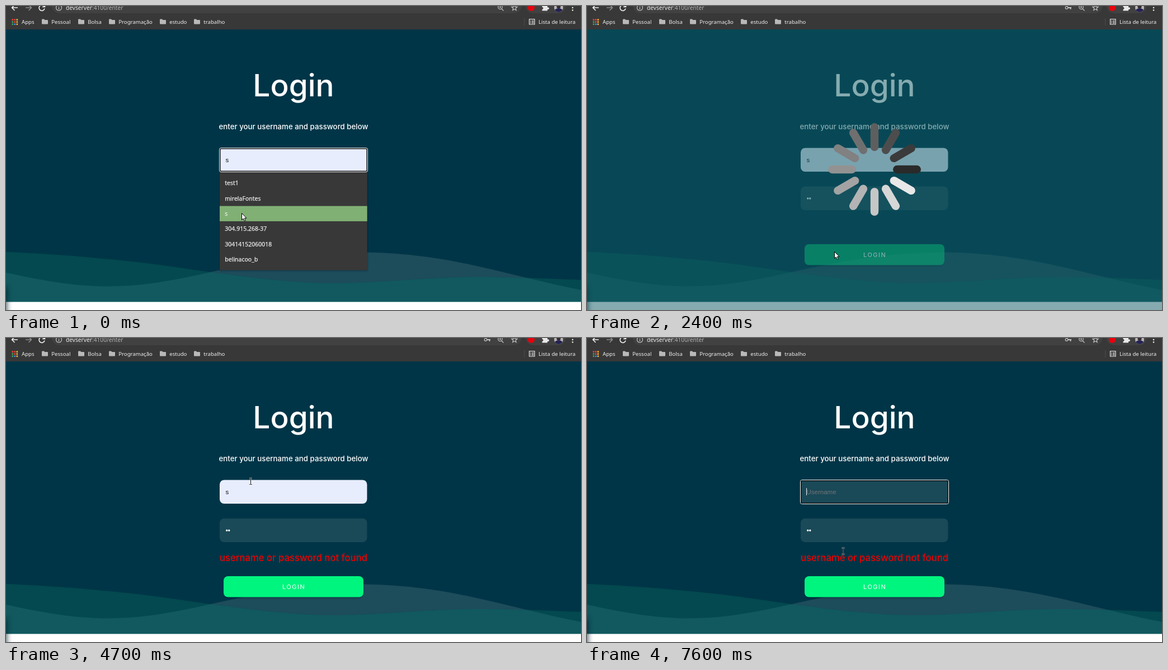
Animation of 1028 by 545 pixels, one loop 8000 ms. Source, as an HTML page:

```html
<!DOCTYPE html>
<html lang="pt-BR">
<head>
<meta charset="utf-8">
<title>Login</title>
<style>
  html, body { margin: 0; width: 100%; height: 100%; overflow: hidden; background: #003547; }
  svg { display: block; width: 100vw; height: 100vh; }
  .ui { font: 9.6px "Noto Sans", "Open Sans", sans-serif; fill: #f0f0f0; }
  .url { font-size: 10.2px; fill: #b4b4b4; }
  .list { font: 10.5px "Noto Sans", "Open Sans", sans-serif; fill: #ececec; stroke: #ececec; stroke-width: .25; }
  .page { font-family: Inter, Roboto, sans-serif; fill: #fff; text-anchor: middle; }
  .input { font: 11.5px "Liberation Sans", Arial, sans-serif; }
  .line { fill: none; stroke: #c4c4c4; stroke-width: 1.2; }
</style>
</head>
<body>
<svg viewBox="0 0 1028 545" preserveAspectRatio="none">
  <defs>
    <path id="waveA" d="M0 441C75 444 135 449 200 455.500C270 462 320 471 380 479C460 490 530 498 600 497C690 495 760 486 840 486C910 486 970 489 1028 491V531H0Z"/>
    <path id="waveB" d="M0 478C60 491 120 503 185 502.500C260 502 320 487 380 474C460 456 550 441 640 441.500C800 444 890 482 1028 509V531H0Z"/>
    <clipPath id="inA"><use href="#waveA"/></clipPath>
    <clipPath id="underButton"><path d="M380 464H650V476H380Z"/></clipPath>
    <filter id="soft" x="-200%" y="-50%" width="500%" height="200%"><feGaussianBlur stdDeviation="5"/></filter>
    <filter id="drop" x="-10%" y="-20%" width="120%" height="150%"><feGaussianBlur stdDeviation="1.800"/></filter>
    <clipPath id="face"><circle cx="988" cy="3" r="8"/></clipPath>
    <path id="folder" fill="#b9b9b9" d="M0 1.500Q0 .500 1 .500H4L5.500 2H10Q11 2 11 3V8.500Q11 9.500 10 9.500H1Q0 9.500 0 8.500Z"/>
  </defs>

  <rect width="1028" height="545" fill="#003547"/>
  <use href="#waveB" fill="#1d4c5b"/>
  <use href="#waveA" fill="#03494f"/>
  <use href="#waveB" fill="#11595f" clip-path="url(#inA)"/>
  <rect y="530.500" width="1028" height="14.500" fill="#fff"/>
  <rect x="-20" y="503" width="22" height="60" fill="#001a26" opacity=".7" filter="url(#soft)"/>

  <text class="page" x="514" y="162" font-size="55" font-weight="500">Login</text>
  <text class="page" x="514" y="221" font-size="13.3" font-weight="500">enter your username and password below</text>

  <g id="user"></g>
  <g id="pass"></g>
  <text id="error" class="page" x="514" y="399.500" font-size="16.7" font-weight="500" style="fill:#f00000">username or password not found</text>

  <g clip-path="url(#underButton)"><rect x="390" y="429.500" width="248" height="37" rx="8" fill="#001c26" opacity=".35" filter="url(#drop)"/></g>
  <rect id="button" x="389" y="427" width="250" height="37.500" rx="8" fill="#00f57f"/>
  <text id="label" class="page" x="514.700" y="449.600" font-size="11" letter-spacing="1.5">LOGIN</text>

  <g id="loading">
    <rect y="42" width="1028" height="503" fill="#105a64" opacity=".51"/>
    <g id="spinner" transform="translate(514 293)"></g>
  </g>

  <g id="menu"></g>

  <g>
    <rect width="1028" height="42" fill="#383838"/>
    <rect x="82" y="-15" width="840" height="28" rx="14" fill="#414141"/>
    <rect x="929" y="-15" width="72" height="28" rx="14" fill="#414141"/>
    <g fill="none" stroke-width="1.6">
      <path d="M21 3H11M15.500 -2L10.500 3L15.500 8" stroke="#f2f2f2"/>
      <path d="M35 3H45M40.500 -2L45.500 3L40.500 8" stroke="#8b8b8b"/>
      <path d="M68.500 1A5 5 0 1 0 69 4.500M69.500 -3V1.500H65" stroke="#f2f2f2"/>
    </g>
    <circle class="line" cx="94.500" cy="3" r="5"/>
    <path class="line" d="M94.500 2V6M94.500 -.500V.800"/>
    <text class="ui url" x="107" y="7"><tspan fill="#f0f0f0">devserver</tspan>:4100/enter</text>
    <g id="key" class="line"><circle cx="857.500" cy="3" r="2.300"/><path d="M860 3H866M864.500 3V6" stroke-width="1.8"/></g>
    <g class="line"><circle cx="883.500" cy="2" r="3.700"/><path d="M886 5L889.500 8.500M881.800 2H885.200M883.500 .300V3.700"/></g>
    <path id="star" class="line"/>
    <circle cx="939" cy="3" r="6" fill="#e8000b"/>
    <path d="M958.500 -1H962A2 2 0 1 1 965.500 -1H968V2.500A2 2 0 1 1 968 6V8.500H958.500V6A2 2 0 1 0 958.500 2Z" fill="#e8e8e8"/>
    <g clip-path="url(#face)">
      <rect x="980" y="-5" width="16" height="16" fill="#b9b5b4"/>
      <circle cx="988" cy="1" r="3.600" fill="#342b36"/>
      <ellipse cx="988" cy="10" rx="8" ry="6" fill="#242354"/>
    </g>
    <g fill="#eee"><circle cx="1013" cy="-1.500" r="1.300"/><circle cx="1013" cy="3" r="1.300"/><circle cx="1013" cy="7.500" r="1.300"/></g>
    <g id="apps"></g>
    <g id="marks" class="ui"><text x="28" y="32">Apps</text><text x="952" y="32">Lista de leitura</text></g>
    <path d="M926.500 22V35" stroke="#4a4a4a"/>
    <path class="line" d="M935.500 23.500H945V33H935.500ZM937 26H938.500M940 26H943.500M937 28.300H938.500M940 28.300H943.500M937 30.600H938.500M940 30.600H943.500" style="stroke:#e8e8e8"/>
  </g>

  <g id="pointer"></g>
</svg>

<script>
const LOOP = 8000;
const $ = id => document.getElementById(id);
const range = n => [...Array(n).keys()];
const show = (id, on) => $(id).style.display = on ? "" : "none";

const firstList = ["test1", "mirelaFontes", "s", "304.915.268-37", "30414152060018", "belinacoo_b"];
const mail = "sorvel.tindal@estudante.quvz.edu.br";
const typedList = ["s", mail, "sdfsdfsdf", mail, "sdfsdfsd", "sdsd"];

const start = {
  user: "s", filled: true, focus: "user", userCaret: 0, selected: false,
  dots: 0, passCaret: 0, list: firstList, hot: 2,
  solid: 1, head: -1, error: false, key: false, cursor: ["arrow", 421, 371]
};

// Each step lists only what differs from the step before it.
const steps = [
  [0, start],
  [600, { list: null, hot: -1, userCaret: 398.5 }],
  [900, { focus: "pass", userCaret: 0, passCaret: 393, cursor: ["beam", 441, 352] }],
  [1500, { dots: 1, passCaret: 396.5 }],
  [1600, { dots: 2, passCaret: 401, key: true }],
  [1800, { cursor: ["beam", 441, 362] }],
  [1900, { cursor: ["arrow", 441, 386] }],
  [2000, { cursor: ["arrow", 442, 412] }],
  [2100, { solid: .85, cursor: ["hand", 442, 435] }],
  [2200, { solid: .7, focus: "", passCaret: 0, cursor: ["hand", 442, 439.5] }],
  [2300, { solid: .6 }],
  [2400, { head: 3, cursor: ["arrow", 442, 440] }],
  [2500, { head: 4, solid: .65, cursor: ["arrow", 450, 438] }],
  [2600, { head: 5, solid: .78, cursor: ["arrow", 463, 433] }],
  [2700, { head: 6, solid: .9, cursor: ["arrow", 475, 429] }],
  [2800, { head: 7, solid: 1, cursor: ["arrow", 483, 426.5] }],
  [3800, { head: -1, solid: .6, error: true, cursor: ["hand", 484.5, 425] }],
  [4000, { cursor: ["hand", 509, 454] }],
  [4300, { solid: 1, cursor: ["arrow", 441, 249.5] }],
  [4500, { cursor: ["beam", 446, 257] }],
  [4700, { cursor: ["beam", 437.5, 257] }],
  [4900, { cursor: ["beam", 436, 267] }],
  [5100, { focus: "user", userCaret: 392.5, cursor: ["beam", 434.5, 267] }],
  [5200, { list: typedList }],
  [5700, { userCaret: 0, cursor: null }],
  [6300, { selected: true }],
  [6700, { user: "", filled: false, selected: false, list: null }],
  [6900, { userCaret: 392.5 }],
  [7300, { userCaret: 0, cursor: ["arrow", 370, 416] }],
  [7600, { userCaret: 392.5, cursor: ["beam", 458, 382] }]
];

const rect = (x, y, w, h, rx, attrs) =>
  `<rect x="${x}" y="${y}" width="${w}" height="${h}" rx="${rx}" ${attrs}/>`;
const text = (x, y, str, attrs) => `<text x="${x}" y="${y}" ${attrs}>${str}</text>`;

function box(y, fill, focused) {
  if (!focused) return rect(382, y, 263.5, 42.5, 8, `fill="${fill}"`);
  return rect(381.5, y, 265, 43, 3, `fill="${fill}" stroke="#f4f4f4"`) +
    rect(382.75, y + 1.25, 262.5, 40.5, 2, 'fill="none" stroke="#101010" stroke-width="1.5"');
}

const caret = (x, y, color) => x ? rect(x - .45, y, .9, 13, 0, `fill="${color}"`) : "";
const hint = (y, str) => text(392.5, y, str, 'class="input" fill="#757575"');

function drawUser(s) {
  let out = box(254.5, s.filled ? "#e8edfe" : "#1a4958", s.focus === "user");
  if (s.selected) out += rect(392.5, 269, 6, 13, 0, 'fill="#3584e4"');
  out += s.user ? text(392.5, 280, s.user, `class="input" fill="${s.selected ? "#fff" : "#111"}"`)
    : hint(280, "Username");
  return out + caret(s.userCaret, 269, s.filled ? "#111" : "#fff");
}

function drawPass(s) {
  const dots = range(s.dots).map(i => `<circle cx="${394.8 + i * 4}" cy="345" r="1.7" fill="#fff"/>`).join("");
  return box(323.5, "#1a4958", s.focus === "pass") + (dots || hint(349, "Password")) +
    caret(s.passCaret, 338, "#fff");
}

function drawMenu(s) {
  if (!s.list) return "";
  const rows = s.list.map((str, i) => {
    const mid = 317.6 + i * 27.3;
    const bar = i === s.hot ? rect(382, mid - 13.6, 263.7, 27.3, 0, 'fill="#81b075"') : "";
    return bar + text(391.3, mid + 3.7, str, 'class="list"');
  });
  return rect(382, 300, 264, 174.5, 1, 'fill="#001018" opacity=".4" filter="url(#drop)"') +
    rect(382, 298, 263.7, 175.5, 1, 'fill="#383838"') + rows.join("");
}

function drawSpinner(head) {
  return range(12).map(i => {
    const age = (head - i + 12) % 12;
    const c = Math.round(42 + age * 17.3);
    return rect(-7.2, -83, 14.4, 50, 7.2, `fill="rgb(${c},${c},${c})" transform="rotate(${i * 30})"`);
  }).join("");
}

const beam = "M-2.5 -5.500H-.800Q0 -5.500 0 -4.700V4.700Q0 5.500 -.800 5.500H-2.500M2.500 -5.500H.800Q0 -5.500 0 -4.700V4.700Q0 5.500 .800 5.500H2.500";
const pointers = {
  arrow: '<path d="M.5 .5V12.500L3.200 10L5.200 14.400L7.200 13.500L5.300 9.300H9Z" fill="#fff" stroke="#000"/>',
  beam: `<path d="${beam}" fill="none" stroke="#fff" stroke-width="2" opacity=".8"/><path d="${beam}" fill="none" stroke="#111" stroke-width=".9"/>`,
  hand: '<path d="M-.8 .800Q.300 -.300 1.200 .900L2.800 4.800Q4 3.900 4.800 4.700Q6 4.200 6.600 5.200Q8.200 5 8.200 6.800V9Q8.200 10.500 7.200 12H1.700L-2.600 7.900Q-2.500 6.500 -1 6.900L.600 7.800L-.900 2.500Z" fill="#fff" stroke="#000"/>'
};

function drawPointer(cursor) {
  if (!cursor) return "";
  const [kind, x, y] = cursor;
  return `<g transform="translate(${x} ${y})">${pointers[kind]}</g>`;
}

function render(s) {
  $("user").innerHTML = drawUser(s);
  $("pass").innerHTML = drawPass(s);
  $("menu").innerHTML = drawMenu(s);
  $("spinner").innerHTML = drawSpinner(s.head);
  $("pointer").innerHTML = drawPointer(s.cursor);
  $("button").setAttribute("fill-opacity", s.solid);
  $("label").setAttribute("font-weight", s.solid < .8 ? 500 : 400);
  show("loading", s.head >= 0);
  show("error", s.error);
  show("key", s.key);
}

function drawToolbar() {
  const colors = ["#e8453c", "#e8453c", "#f2b632", "#3aa757", "#e8453c", "#f2b632", "#3aa757", "#4688f1", "#f2b632"];
  $("apps").innerHTML = colors.map((c, i) =>
    rect(10.5 + i % 3 * 4, 23.3 + Math.floor(i / 3) * 4, 2.6, 2.6, .5, `fill="${c}"`)).join("");
  const folders = [[64, "Pessoal"], [129, "Bolsa"], [184, "Programação"], [275, "estudo"], [336, "trabalho"]];
  $("marks").innerHTML += folders.map(([x, name]) =>
    `<use href="#folder" x="${x}" y="23"/>` + text(x + 17.3, 32, name, "")).join("");
  const points = range(10).map(i => {
    const r = i % 2 ? 2.3 : 5.3, a = i * Math.PI / 5;
    return `${(909 + r * Math.sin(a)).toFixed(1)} ${(3.3 - r * Math.cos(a)).toFixed(1)}`;
  });
  $("star").setAttribute("d", `M${points.join("L")}Z`);
}

const states = [];
steps.forEach(([, change], i) => states.push({ ...states[i - 1], ...change }));

let shown = -1;
const origin = performance.now();
function tick() {
  const t = Math.max(0, performance.now() - origin) % LOOP;
  const now = steps.filter(([at]) => at <= t).length - 1;
  if (now !== shown) render(states[shown = now]);
  requestAnimationFrame(tick);
}

drawToolbar();
tick();
</script>
</body>
</html>
```
